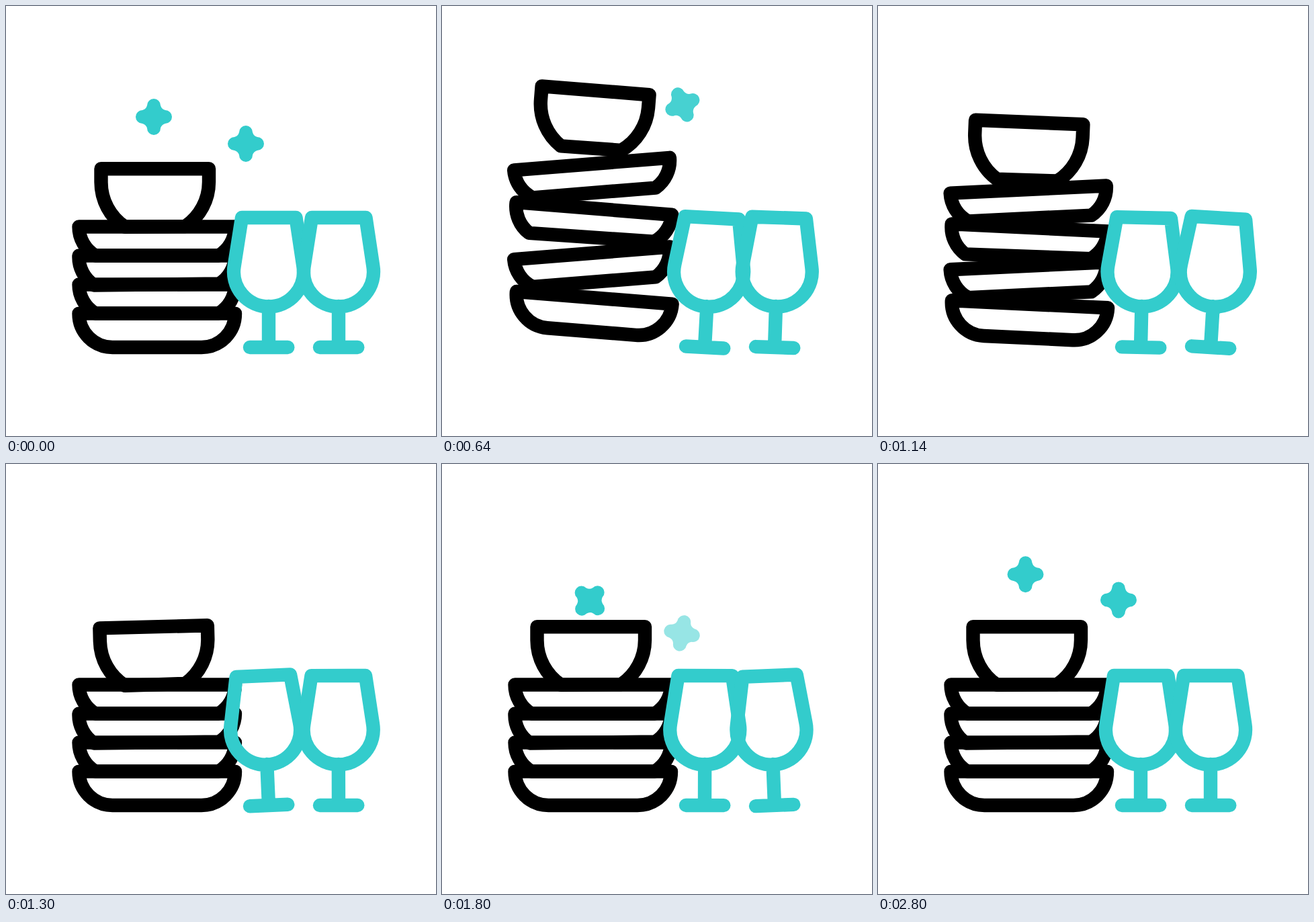
Write an HTML page that moves like this. It is 640 by 640 pixels and loops after 2.82 s.

```html
<!DOCTYPE html>
<html lang="en">
<head>
<meta charset="utf-8">
<title>Clean dishes</title>
<style>
  html, body { margin: 0; width: 100%; height: 100%; overflow: hidden; background: #fff; }
  svg { display: block; width: 100%; height: 100%; }
</style>
</head>
<body>
<svg id="stage" viewBox="0 0 640 640" fill="none" stroke-width="20.4" stroke-linecap="round" stroke-linejoin="round"></svg>
<script>
const LOOP = 2820;
const TEAL = '#33cccc';
const stage = document.getElementById('stage');

function addPath(d, attrs) {
  const el = document.createElementNS('http://www.w3.org/2000/svg', 'path');
  el.setAttribute('d', d);
  for (const name in attrs) el.setAttribute(name, attrs[name]);
  stage.appendChild(el);
  return el;
}

const clamp = u => Math.min(1, Math.max(0, u));
const mix = (a, b, p) => a + (b - a) * p;
const ramp = (t, start, end) => {
  const u = clamp((t - start) / (end - start));
  return u * u * (3 - 2 * u);
};

// Eased value through [time, value] keys.
function track(t, keys) {
  let value = keys[0][1];
  for (let i = 1; i < keys.length; i++) {
    value = mix(value, keys[i][1], ramp(t, keys[i - 1][0], keys[i][0]));
  }
  return value;
}

const black = { stroke: '#000' };
const teal = { stroke: TEAL };

const platePath = (y, skew) =>
  `M108.5 ${y}H341A50 50 0 0 1 ${316.5 + skew} ${y + 43 - skew}L${133 - 2 * skew} ${y + 43 + skew}A50 50 0 0 1 108.5 ${y}Z`;

// Bottom to top; each piece lifts one step further than the one below.
const plates = [
  { el: addPath('M108.5 457.6H341A50 50 0 0 1 291 508H158.5A50 50 0 0 1 108.5 457.6Z', black), pivot: 483 },
  { el: addPath(platePath(414.5, 0), black), pivot: 436 },
  { el: addPath(platePath(371.5, 1), black), pivot: 393 },
  { el: addPath(platePath(328.5, 0), black), pivot: 350 }
];
const bowl = addPath('M141.5 242.3H302V262A80.2 80.2 0 0 1 267 328L177 328.8A80.2 80.2 0 0 1 141.5 262Z', black);

const glassPath = 'M-40 -193H40.5L51.3 -121A52 52 0 1 1 -51.3 -121ZM0 -61V0M-28 0H28.3';
const glasses = [
  { el: addPath(glassPath, teal), x: 391, sway: [[290, 0], [890, 5], [1500, -5], [2090, 5], [2785, 0]] },
  { el: addPath(glassPath, teal), x: 495, sway: [[390, 0], [990, 5], [1600, -5], [2190, 5], [2800, 0]] }
];

const sparklePath = 'M-10 -17A10 10 0 0 1 10 -17Q11.5 -11.5 17 -10A10 10 0 0 1 17 10' +
  'Q11.5 11.5 10 17A10 10 0 0 1 -10 17Q-11.5 11.5 -17 10A10 10 0 0 1 -17 -10Q-11.5 -11.5 -10 -17Z';
const sparkles = [
  { leave: [0, 620], enter: [1600, 2225], out: [[220, 165], [220, 101]], back: [[220, 216], [219.5, 164.3]] },
  { leave: [155, 785], enter: [1706, 2345], out: [[357, 205], [358, 138]], back: [[357, 255], [358, 202.4]] }
].map(s => ({ ...s, el: addPath(sparklePath, { fill: TEAL }) }));

function drawStack(t) {
  const lift = ramp(t, 130, 750) * (1 - ramp(t, 1000, 1300));
  plates.forEach(({ el, pivot }, i) => {
    const angle = (i % 2 ? -5 : 5) * lift;
    el.setAttribute('transform', `translate(0 ${-25.45 * (i + 1) * lift}) rotate(${angle} 224.75 ${pivot})`);
  });
  const tilt = track(t, [[130, 0], [750, 5], [1000, 5], [1320, -1.5], [1320, -1.5], [1530, 0]].filter((k, i) => i !== 4));
  bowl.setAttribute('transform', `translate(0 ${-127.2 * lift}) rotate(${tilt} 221.7 328)`);
}

function drawGlasses(t) {
  for (const { el, x, sway } of glasses) {
    el.setAttribute('transform', `translate(${x} 508) rotate(${track(t, sway)})`);
  }
}

function drawSparkles(t) {
  for (const { el, leave, enter, out, back } of sparkles) {
    const leaving = t < LOOP / 2;
    const p = ramp(t, ...(leaving ? leave : enter));
    const [from, to] = leaving ? out : back;
    const opacity = leaving ? (leave[1] - t) / 160 : (t - enter[0]) / 188;
    el.setAttribute('transform',
      `translate(${mix(from[0], to[0], p)} ${mix(from[1], to[1], p)}) rotate(${180 * p})`);
    el.setAttribute('opacity', clamp(opacity));
  }
}

function draw(t) {
  drawStack(t);
  drawGlasses(t);
  drawSparkles(t);
}

const begin = performance.now();
function tick() {
  draw((performance.now() - begin) % LOOP);
  requestAnimationFrame(tick);
}
draw(0);
requestAnimationFrame(tick);
</script>
</body>
</html>
```
